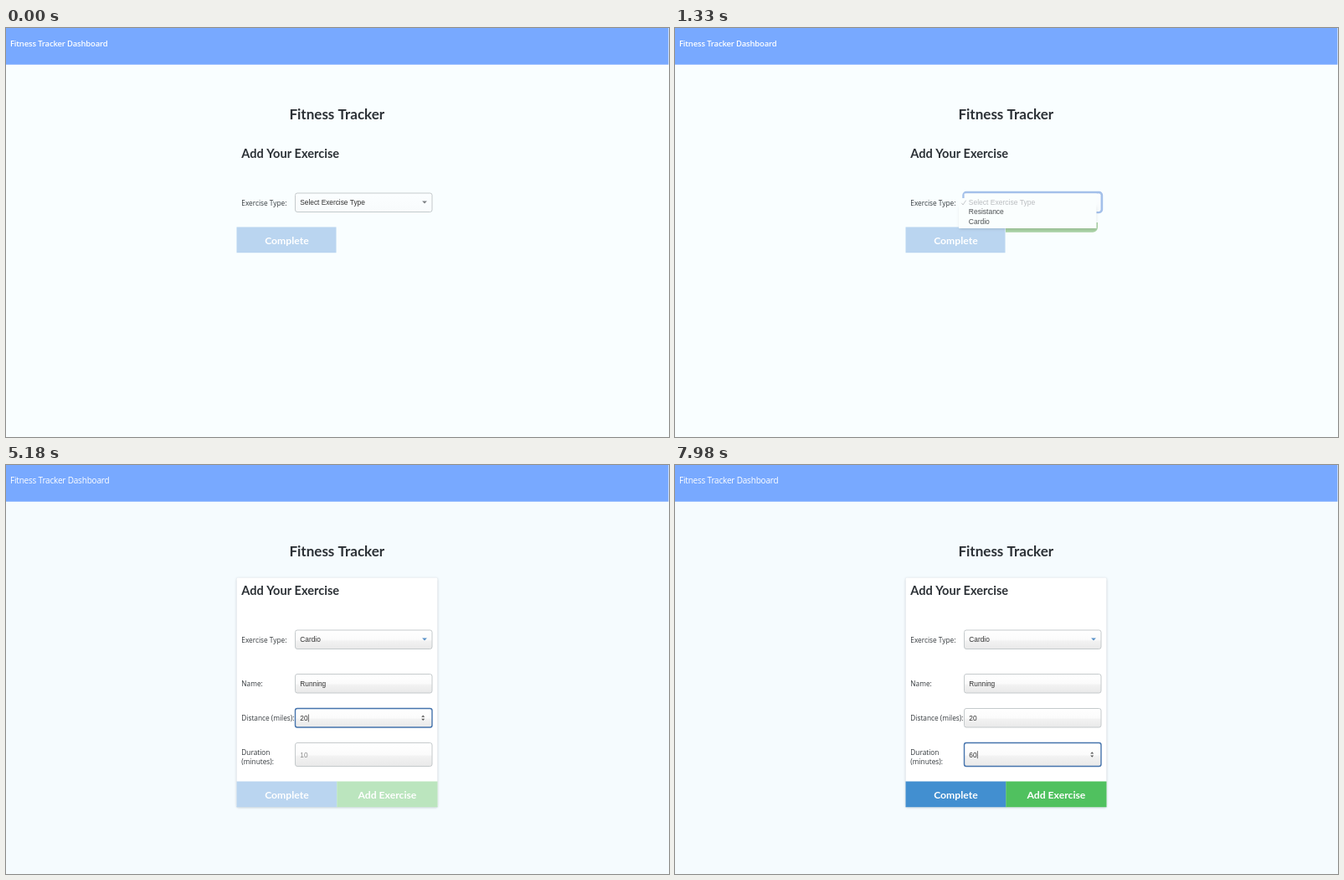
An HTML page with a canvas for the animation above (8000 ms loop, 792 px wide and 488 px high).

```html
<!DOCTYPE html>
<html lang="en">
<head>
<meta charset="utf-8">
<title>Fitness Tracker</title>
<style>
html, body { margin: 0; width: 100%; height: 100%; overflow: hidden; background: #f5fbfe; }
canvas { display: block; width: 792px; height: 488px; }
</style>
</head>
<body>
<canvas id="stage"></canvas>
<script>
const W = 792, H = 488, LOOP = 8000;
const canvas = document.getElementById('stage');
const ctx = canvas.getContext('2d');
const dpr = window.devicePixelRatio || 1;
canvas.width = W * dpr;
canvas.height = H * dpr;
ctx.scale(dpr, dpr);

const HEAD = 'Lato, sans-serif';
const LABEL = '"Open Sans", "Noto Sans", sans-serif';
const INPUT = '"Liberation Sans", Arial, sans-serif';

// Moments of the interaction, in ms
const MENU = 840, PICK = 1540, HOVER = 7700, ENABLE = 6580;
const fields = [
  { top: 249.5, h: 22.5, hint: 'Running', text: 'Running', focus: 2870, blur: 4480, start: 3150, step: 125 },
  { top: 290.5, h: 22.5, hint: '5', text: '20', focus: 4480, blur: 5740, start: 4970, step: 210, number: true },
  { top: 331.5, h: 28, hint: '10', text: '60', focus: 5740, blur: LOOP, start: 6580, step: 140, number: true }
];

function text(str, x, y, size, family, color, weight = 400, align = 'left') {
  ctx.font = `${weight} ${size}px ${family}`;
  ctx.fillStyle = color;
  ctx.textAlign = align;
  ctx.fillText(str, x, y);
}

function rect(x, y, w, h, color) {
  ctx.fillStyle = color;
  ctx.fillRect(x, y, w, h);
}

function roundPath(x, y, w, h, r) {
  ctx.beginPath();
  ctx.roundRect(x, y, w, h, r);
}

function shadowed(color, blur, dy, draw) {
  ctx.save();
  ctx.shadowColor = color;
  ctx.shadowBlur = blur * dpr;
  ctx.shadowOffsetY = dy * dpr;
  draw();
  ctx.restore();
}

function triangle(x, y, half, height, color) {
  ctx.beginPath();
  ctx.moveTo(x - half, y);
  ctx.lineTo(x + half, y);
  ctx.lineTo(x, y + height);
  ctx.fillStyle = color;
  ctx.fill();
}

function mix(a, b, k) {
  const p = Math.min(1, Math.max(0, k));
  return `rgb(${a.map((v, i) => Math.round(v + (b[i] - v) * p)).join(',')})`;
}

function box(top, h, flat, border, width) {
  const fill = ctx.createLinearGradient(0, top, 0, top + h);
  if (flat) {
    fill.addColorStop(0, '#fbfeff');
    fill.addColorStop(1, '#f8fbfc');
  } else {
    fill.addColorStop(0, '#ffffff');
    fill.addColorStop(0.5, '#fbfbfb');
    fill.addColorStop(0.58, '#f2f2f2');
    fill.addColorStop(1, '#e9e9e9');
  }
  roundPath(345.5, top, 163.5, h, 2.5);
  ctx.fillStyle = fill;
  ctx.fill();
  ctx.strokeStyle = border;
  ctx.lineWidth = width;
  ctx.stroke();
}

function focusRing() {
  roundPath(344.4, 195.9, 165.7, 24.2, 3.5);
  ctx.strokeStyle = '#a3c0ea';
  ctx.lineWidth = 2.2;
  ctx.stroke();
}

function drawPage(open) {
  rect(0, 0, W, H, open ? '#f5fbfe' : '#f9feff');
  rect(0, 0, 791.4, 43.7, '#78a9ff');
  ctx.letterSpacing = '-0.19px';
  const [size, weight] = open ? [10, 400] : [9.5, 600];
  text('Fitness Tracker Dashboard', 5, 21.5, size, LABEL, '#ffffff', weight);
  ctx.letterSpacing = '0px';
  text('Fitness Tracker', 395.3, 109.3, 17.05, HEAD, '#2c3136', 700, 'center');
}

function drawButtons(t, open) {
  const y = open ? 377.5 : 237.5;
  const on = (t - ENABLE) / 100;
  const blue = t < HOVER
    ? mix([186, 213, 240], [75, 156, 219], on)
    : mix([75, 156, 219], [66, 143, 208], (t - HOVER) / 100);
  rect(275.5, y, open ? 120 : 119, 30.7, blue);
  text('Complete', 335.4, y + 20.4, 12.2, HEAD, '#ffffff', 700, 'center');
  if (!open) return;
  rect(395.3, y, 120.2, 30.7, mix([187, 229, 190], [80, 193, 95], on));
  text('Add Exercise', 455.4, y + 20.4, 12.2, HEAD, '#ffffff', 700, 'center');
}

function drawSelect(t, open) {
  const focused = t >= MENU && t < fields[0].focus;
  box(197, 22.5, !open, focused ? '#a3c0ea' : '#bfc4c7', 0.9);
  if (focused) focusRing();
  text(open ? 'Cardio' : 'Select Exercise Type', 351.3, 211.1, 8.3, INPUT, '#303030');
  triangle(500, 206.6, 2.9, 3, open ? '#5790c8' : '#7b7f82');
}

function drawMenu() {
  roundPath(395, 232, 110, 11.8, [0, 0, 6, 0]);
  ctx.fillStyle = '#a9d2a5';
  ctx.fill();
  shadowed('rgba(0,0,0,0.14)', 3, 1, () => rect(340, 212, 163, 26.8, '#fafefe'));
  rect(345.6, 197.5, 158, 12, '#fafefe');
  rect(339, 203, 164.5, 36, '#fafefe');
  ctx.beginPath();
  ctx.moveTo(342.3, 208.8);
  ctx.lineTo(344, 211);
  ctx.lineTo(347.6, 205.6);
  ctx.strokeStyle = '#b9bdc0';
  ctx.lineWidth = 0.8;
  ctx.stroke();
  text('Select Exercise Type', 350.8, 211.1, 8.5, INPUT, '#babdc0');
  text('Resistance', 350.8, 222.4, 8.5, INPUT, '#4c4f52');
  text('Cardio', 350.8, 234, 8.5, INPUT, '#4c4f52');
}

function drawField(f, t) {
  const focused = t >= f.focus && t < f.blur;
  const count = t < f.start ? 0 : Math.min(f.text.length, Math.floor((t - f.start) / f.step) + 1);
  const typed = f.text.slice(0, count);
  const base = f.top + f.h / 2 + 3;
  box(f.top, f.h, false, focused ? '#4674ad' : '#bfc4c7', focused ? 1.4 : 0.9);
  text(typed || f.hint, 351.3, base, 8.3, INPUT, typed ? '#303030' : '#8c8c8c');
  if (!focused) return;
  const lastKey = count ? f.start + (count - 1) * f.step : f.focus;
  if ((t - lastKey) % 1000 < 500) {
    rect(351.7 + ctx.measureText(typed).width, base - 7.3, 0.7, 9, '#333333');
  }
  if (f.number) {
    const mid = f.top + f.h / 2;
    triangle(498.2, mid - 0.9, 2, -2.4, '#555555');
    triangle(498.2, mid + 0.9, 2, 2.4, '#555555');
  }
}

function drawForm(t, open) {
  if (open) {
    shadowed('rgba(60,80,95,0.35)', 2.5, 0.6, () => {
      roundPath(275.5, 134.5, 240, 273.7, 2);
      ctx.fillStyle = '#ffffff';
      ctx.fill();
    });
  }
  text('Add Your Exercise', 281.3, 154.5, 14.55, HEAD, '#2c3136', 700);
  text('Exercise Type:', 281.3, 211.6, 8.3, LABEL, '#33383c');
  drawSelect(t, open);
  if (open) {
    text('Name:', 281.3, 264.2, 8.3, LABEL, '#33383c');
    text('Distance (miles):', 281.3, 305, 8.3, LABEL, '#33383c');
    text('Duration', 281.3, 345.8, 8.3, LABEL, '#33383c');
    text('(minutes):', 281.3, 357.2, 8.3, LABEL, '#33383c');
    fields.forEach(f => drawField(f, t));
  }
  drawButtons(t, open);
  if (t >= MENU && t < PICK) drawMenu();
}

function frame() {
  const t = performance.now() % LOOP;
  const open = t >= PICK;
  drawPage(open);
  drawForm(t, open);
  requestAnimationFrame(frame);
}
frame();
</script>
</body>
</html>
```
